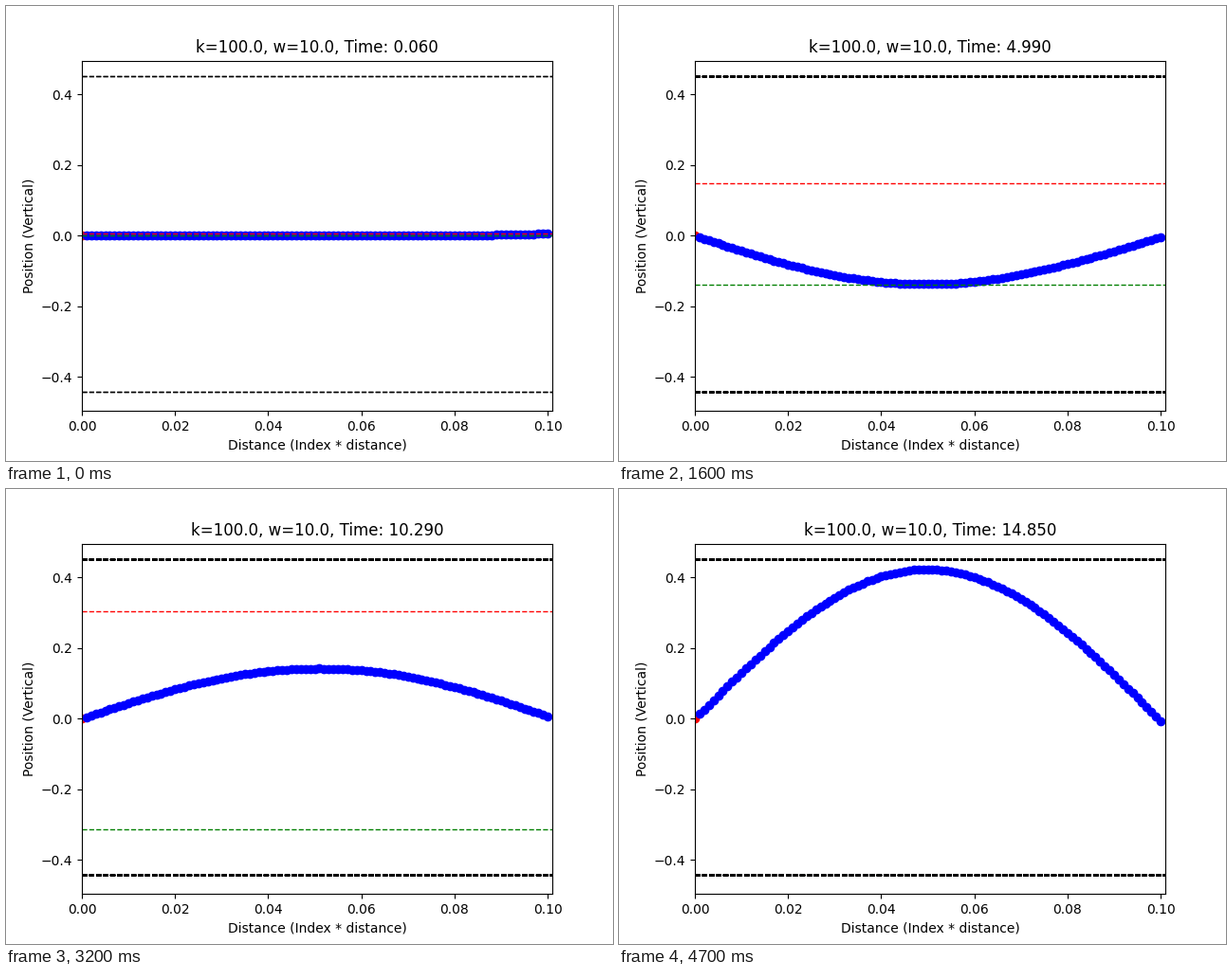
These frames come from a looping animation (640 px wide and 480 px high, 4800 ms). A matplotlib script:

```python
import numpy as np
import matplotlib.pyplot as plt
from matplotlib.animation import FuncAnimation

# A chain of springs, fixed on the left and shaken on the right
K, W, MASS = 100.0, 10.0, 0.001
N, SPACING, AMP = 101, 0.001, 0.01
DT, SAVE_EVERY, T_END = 0.001, 10, 15.0
FRAMES, INTERVAL = 48, 100


def simulate():
    """Return the chain's positions, one row per 0.01 s."""
    y, v = np.zeros(N), np.zeros(N)
    rows = [y.copy()]
    for step in range(1, round(T_END / DT) + 1):
        v[1:-1] += K / MASS * (y[2:] - 2 * y[1:-1] + y[:-2]) * DT
        y[1:-1] += v[1:-1] * DT
        y[-1] = AMP * np.sin(W * step * DT)
        if step % SAVE_EVERY == 0:
            rows.append(y.copy())
    return np.array(rows)


rows = simulate()
highs = np.maximum.accumulate(rows.max(axis=1))
lows = np.minimum.accumulate(rows.min(axis=1))
top, bottom = highs[-1], lows[-1]
# The sampling pace drifts a little over the run
samples = np.rint(np.interp(np.arange(FRAMES),
                            [0, 7, 16, 22, 32, 40, 47],
                            [6, 228, 499, 690, 1029, 1294, 1485])).astype(int)

fig, ax = plt.subplots(figsize=(6.4, 4.8), dpi=100)
x = np.arange(N) * SPACING
limit = 1.1 * max(top, -bottom)
ax.set_xlim(0, N * SPACING)
ax.set_ylim(-limit, limit)
ax.set_xlabel("Distance (Index * distance)")
ax.set_ylabel("Position (Vertical)")
title = ax.set_title("")


def level(y, color):
    return ax.axhline(y, color=color, linestyle="--", linewidth=1)


ax.plot([0], [0], "ro")
chain, = ax.plot(x[1:], rows[0, 1:], "bo")
high_line, low_line = level(0, "r"), level(0, "g")
# The outer levels are overdrawn once more per frame, so their edges darken
outer = [(level(top, "k"), level(bottom, "k")) for _ in range(FRAMES + 1)]


def update(frame):
    i = samples[frame]
    chain.set_ydata(rows[i, 1:])
    high_line.set_ydata([highs[i]] * 2)
    low_line.set_ydata([lows[i]] * 2)
    for n, pair in enumerate(outer):
        for line in pair:
            line.set_visible(n < frame + 2)
    title.set_text(f"k={K}, w={W}, Time: {i * DT * SAVE_EVERY:.3f}")
    return chain, high_line, low_line, title


anim = FuncAnimation(fig, update, frames=FRAMES, interval=INTERVAL,
                     repeat=True, repeat_delay=0, blit=False)
plt.show()
```
